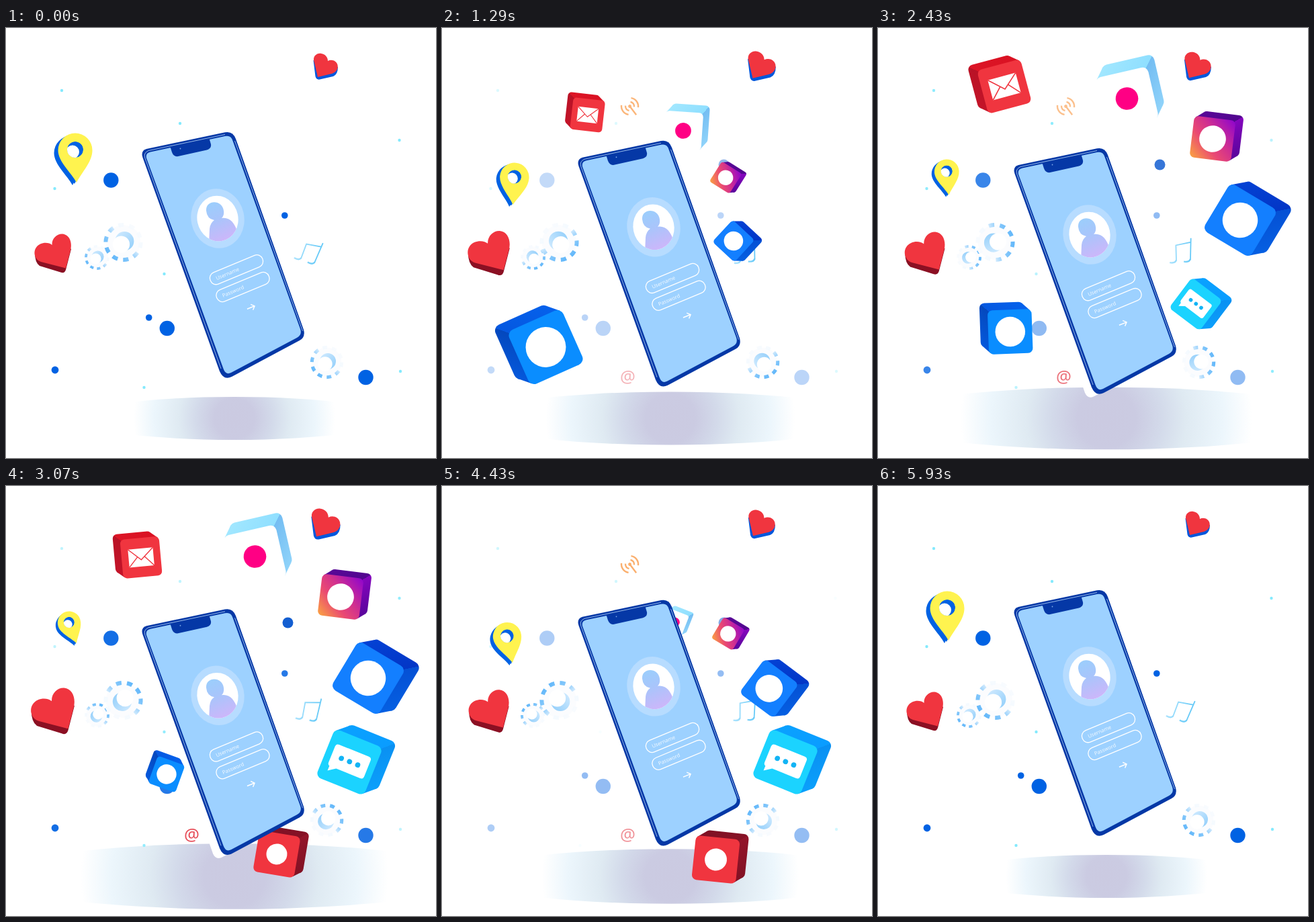
Animation, 640 px wide and 640 px high, one loop 6 s. Source, as an HTML page:

```html
<!DOCTYPE html>
<html lang="en">
<head>
<meta charset="utf-8">
<title>Floating phone</title>
<style>
  html, body { margin: 0; width: 100%; height: 100%; overflow: hidden; background: #fff; }
  svg { display: block; width: 100vw; height: 100vh; }
  text { font-family: "Noto Sans", "Open Sans", sans-serif; }
</style>
</head>
<body>
<svg id="stage" viewBox="0 0 640 640" xmlns="http://www.w3.org/2000/svg"></svg>
<script>
const LOOP = 6000, SPAN = 5930;
const stage = document.getElementById('stage');
const updates = [];
const add = markup => {
  stage.insertAdjacentHTML('beforeend', markup);
  return stage.lastElementChild;
};
const clamp = v => Math.max(0, Math.min(1, v));
const mix = (a, b, k) => a + (b - a) * k;
const tri = u => 1 - Math.abs(1 - 2 * (u % 1));

// Swings between 0 and 1, reversing at each listed time
function zigzag(t, turns, first) {
  let i = 0;
  while (i < turns.length - 2 && t > turns[i + 1]) i++;
  const k = clamp((t - turns[i]) / (turns[i + 1] - turns[i]));
  return i % 2 ? mix(1 - first, first, k) : mix(first, 1 - first, k);
}
const fadeOutIn = (el, ...turns) => updates.push(t => el.setAttribute('opacity', zigzag(t, turns, 1)));
const fadeInOut = (el, ...turns) => updates.push(t => el.setAttribute('opacity', zigzag(t, turns, 0)));
const move = (el, fn) => updates.push((t, u) => el.setAttribute('transform', fn(t, u)));

const stops = list => list.map(([o, c]) => `<stop offset="${o}" stop-color="${c}"/>`).join('');

add(`<defs>
  <radialGradient id="ground" gradientUnits="userSpaceOnUse" cx="0" cy="0" r="150">
    ${stops([[0, '#cbcae1'], [.2, '#cbcbe2'], [.38, '#d3daea'], [.55, '#dfeaf2'], [.8, '#ecf6fc'], [1, '#fff']])}
  </radialGradient>
  <linearGradient id="person" x1="0" y1="0" x2=".3" y2="1">${stops([[0, '#9acffc'], [.45, '#a8c5fb'], [1, '#cdb6fa']])}</linearGradient>
  <linearGradient id="teeth" x1="0" y1="1" x2="1" y2="0">${stops([[.1, '#5fb6fa'], [.4, '#8ccbfb'], [.65, '#f4faff'], [1, '#fbfcfe']])}</linearGradient>
  <linearGradient id="bore" x1="0" y1="0" x2="1" y2="1">${stops([[0, '#d4ecff'], [1, '#8fcdfa']])}</linearGradient>
  <linearGradient id="note" gradientUnits="userSpaceOnUse" x1="-16" y1="0" x2="18" y2="0">${stops([[0, '#a9e2fd'], [1, '#62c8f7']])}</linearGradient>
  <linearGradient id="sunset" x1="0" y1="1" x2="1" y2="0">${stops([[0, '#fba63f'], [.35, '#ea4a72'], [.6, '#d02f90'], [1, '#8d04cf']])}</linearGradient>
  <clipPath id="face"><ellipse cx="315" cy="283.5" rx="30.5" ry="34" transform="rotate(-12 315 283.5)"/></clipPath>
  <clipPath id="hole"><circle cx="2" cy="-52" r="12"/></clipPath>
</defs>`);

const ground = add('<ellipse rx="236" ry="32" fill="url(#ground)"/>');
move(ground, (t, u) => `translate(340 581) scale(${1 + .545 * tri(u)})`);

const dots = (color, ...places) => add(`<g fill="${color}">` +
  places.map(([x, y, r = 2.2]) => `<circle cx="${x}" cy="${y}" r="${r}"/>`).join('') + '</g>');
const SPARK = '#85eafd', BLUE = '#0062e3';
fadeOutIn(dots(SPARK, [83, 93], [259, 142], [72.5, 239], [587, 511]), 0, 900, 2300, 3900, 5300);
fadeOutIn(dots(SPARK, [585.5, 167], [235.5, 366], [205.5, 535]), 0, 1300, 3300, 4500, SPAN);
fadeOutIn(dots(BLUE, [156.3, 226.5, 11.2], [73, 509, 5.4]), 0, 800, 2900, 5150, SPAN);
fadeOutIn(dots(BLUE, [239.8, 447, 11.2], [212.7, 431, 4.8], [414.8, 279, 4.8], [535.5, 520, 11.2]), 0, 1760, 3300, 5250, SPAN);

// Small symbols
const arcs = [6.5, 12.5].map(r => {
  const x = r * .72, y = r * .7;
  return `M${x} ${-y}A${r} ${r} 0 0 1 ${x} ${y}M${-x} ${-y}A${r} ${r} 0 0 0 ${-x} ${y}`;
}).join('');
const antenna = add(`<g transform="translate(279.5 116.5) rotate(-37)" fill="none" stroke="#f99238" stroke-width="2.4">
  <path d="${arcs}M0 0V16"/><circle r="2.4" fill="#f99238" stroke="none"/></g>`);
fadeInOut(antenna, 0, 1950, 3070, 4950, SPAN);
fadeInOut(add('<text x="276.5" y="528" font-size="25.500" text-anchor="middle" fill="#e5404c">@</text>'), 0, 3300, SPAN);
fadeInOut(add('<circle cx="419.500" cy="203.500" r="8" fill="#0a58cf"/>'), 0, SPAN / 2, SPAN);

const note = add(`<g fill="none" stroke="url(#note)" stroke-width="1.800">
  <path d="M-7 14L-6 -9L16 -12M17 -18L14 14"/>
  <path stroke-width="2.400" d="M-7 13Q-9 18 -17 16M14 13Q12 18 4 16"/></g>`);
move(note, t => `translate(450 332) rotate(${mix(-16, 18, zigzag(t, [0, 1800, 3600, 5000, SPAN], 1))})`);

function gear(x, y, r) {
  const pitch = 2 * Math.PI * r * .87 / 20;
  const el = add(`<g>
    <circle r="${r * .86}" fill="#fbfcfe"/>
    <circle r="${r * .87}" fill="none" stroke="url(#teeth)" stroke-width="${r * .2}" stroke-dasharray="${pitch}"/>
    <circle r="${r * .47}" cx="${r * .06}" cy="${-r * .06}" fill="url(#bore)"/>
    <circle r="${r * .42}" cx="${-r * .1}" cy="${r * .1}" fill="#fff"/></g>`);
  move(el, (t, u) => `translate(${x} ${y}) rotate(${-360 * u})`);
}
gear(135.5, 341.5, 19);
gear(174.5, 319, 30);
gear(477.5, 497.5, 25.5);

// Extruded square tiles: fly out from behind the phone, growing and unwinding, then return the same way
let tileCount = 0;
function tile({ from, to, size, turn, spin = 58, times, front, cap, side, dx, dy, art }) {
  const id = 'tile' + tileCount++, h = 50, r = 11, a = h - r * .293;
  const cx = Math.sign(dx) * a, cy = Math.sign(dy) * a, n = 100 / Math.hypot(dx, dy);
  const nx = Math.sign(dx) * n * Math.abs(dy), ny = -Math.sign(dy) * n * Math.abs(dx);
  const box = (x, y, fill) => `<rect x="${x - h}" y="${y - h}" width="100" height="100" rx="${r}" fill="${fill}"/>`;
  const el = add(`<g><linearGradient id="${id}" gradientUnits="userSpaceOnUse"
      x1="${cx - nx}" y1="${cy - ny}" x2="${cx + nx}" y2="${cy + ny}">
      ${stops([[0, cap[0]], [.5, cap[1]], [.5, side[0]], [1, side[1]]])}</linearGradient>
    ${box(dx, dy, `url(#${id})`)}
    <path fill="url(#${id})" d="M${-cx} ${cy}l${dx} ${dy}L${cx + dx} ${-cy + dy}L${cx} ${-cy}Z"/>
    ${box(0, 0, front)}${art}</g>`);
  const [enter, arrive, leave, end] = times;
  move(el, t => {
    const k = clamp(Math.min((t - enter) / (arrive - enter), (end - t) / (end - leave)));
    return `translate(${mix(from[0], to[0], k)} ${mix(from[1], to[1], k)})
      rotate(${turn + spin * (1 - k)}) scale(${size * k / 100})`;
  });
}
const disc = (r, fill = '#fff') => `<circle r="${r}" fill="${fill}"/>`;

tile({
  from: [320, 385], to: [154.5, 475], size: 88, turn: -24, spin: 86, times: [0, 1070, 1790, 4300],
  front: '#0a8dff', cap: ['#0566f2', '#0558e0'], side: ['#0448bd', '#0560ea'], dx: -18, dy: -17, art: disc(34)
});
tile({
  from: [288, 235], to: [188, 87], size: 67, turn: -15, spin: 75, times: [300, 1690, 2850, 4540],
  front: '#f0353f', cap: ['#d80f20', '#dc1526'], side: ['#b91226', '#c8152a'], dx: -18, dy: -15,
  art: `<rect x="-32" y="-23" width="64" height="46" fill="#fff"/>
    <path d="M-32 -23L0 6L32 -23M-32 23L-9 -2M32 23L9 -2" fill="none" stroke="#f0353f" stroke-width="2.400"/>`
});
tile({
  from: [331, 269], to: [370.5, 105], size: 80, turn: -13, times: [300, 1700, 3300, 5200],
  front: '#fff', cap: ['#a8eaff', '#8fdfff'], side: ['#74bdf2', '#a2e2ff'], dx: 16, dy: -20, art: disc(21, '#ff0084')
});
tile({
  from: [323, 298], to: [498, 165], size: 62, turn: 7, times: [600, 1820, 3820, 5300],
  front: 'url(#sunset)', cap: ['#5c0a9c', '#52068f'], side: ['#8505bd', '#4b0590'], dx: 18, dy: -14, art: disc(32)
});
tile({
  from: [308, 354], to: [539, 286], size: 82, turn: 31, spin: 26, times: [400, 2035, 3900, 6250],
  front: '#137fff', cap: ['#0448dc', '#0336c6'], side: ['#0550d4', '#0566e8'], dx: 21, dy: -19, art: disc(32)
});
tile({
  from: [365, 411], to: [511, 411], size: 77, turn: 22, times: [1300, 2830, 4700, 6200],
  front: '#1bd3ff', cap: ['#0aa4ff', '#0a9cff'], side: ['#0a90f2', '#0ba6ff'], dx: 21, dy: -19,
  art: `<path fill="#fff" d="M-31 -24H31Q37 -24 37 -18V15Q37 21 31 21H-19L-33 31V21Q-37 20 -37 15V-18Q-37 -24 -31 -24Z"/>
    <g fill="#12b4f5"><circle cx="-17" cy="-1" r="5"/><circle cy="-1" r="5"/><circle cx="17" cy="-1" r="5"/></g>`
});
tile({
  from: [333, 423], to: [407.5, 556], size: 66, turn: 6, times: [1700, 3160, 4950, 6200],
  front: '#f0353f', cap: ['#7c1022', '#861226'], side: ['#93152a', '#7c1022'], dx: 19, dy: -14, art: disc(25)
});

// Phone
const field = (x, y, label) => `<g transform="translate(${x} ${y}) rotate(-22.6)">
  <rect x="-42" y="-9.3" width="84" height="18.6" rx="8.8" fill="none" stroke="#fff" stroke-width="1.3"/>
  <text x="-33" y="3" font-size="7.6" fill="#f2f9ff">${label}</text></g>`;
const phone = add(`<g>
  <path fill="#fff" d="M298 490L308 519Q312 528 320 525L342 514Z"/>
  <path fill="#0538a6" d="M209 180L326 155.3Q337.5 153 342 165L443 449Q446 460 437 465L336 519Q324 525 318 511L203.5 193Q200 183 209 180Z"/>
  <path fill="none" stroke="#b9d8fb" stroke-width=".8" d="M320 507L207 194Q204 186 212 182.5L326 158.5M340.5 168L441.5 451"/>
  <path fill="#9dd1ff" d="M209.5 195L323.5 507Q327 517 335 513L433 461Q441 457 438 448L337.5 168Q335 159 326 161L215 184.5Q206.5 186.5 209.5 195Z"/>
  <path fill="#0538a6" d="M244.5 177L247 185Q249.5 192 256 191L299 181.5Q306 179.5 305 173L302.5 164.5Z"/>
  <circle cx="259.5" cy="179.5" r=".9" fill="#7fa8e8"/>
  <ellipse cx="315" cy="283.5" rx="39.5" ry="44.5" fill="#b7dcff" transform="rotate(-12 315 283.5)"/>
  <g clip-path="url(#face)"><path fill="#fff" d="M280 245H350V322H280Z"/>
    <path fill="url(#person)" d="M298 272C297 255 322 255 324 272Q325 279 321 283C333 281 340 290 344 302L338 322H302L303 299Q304 290 310 286Q299 284 298 272Z"/></g>
  ${field(343, 359.7, 'Username')}${field(352.5, 385.5, 'Password')}
  <path transform="translate(364.5 416) rotate(-22)" d="M-6 0H6M1.5 -4.5L6 0L1.5 4.5" fill="none" stroke="#fff" stroke-width="1.4"/>
</g>`);
move(phone, (t, u) => `translate(0 ${29.3 * tri(u)})`);

// Map pin, anchored at its tip: two bounces, leaning right, then recovering from the left
const drop = 'M4 -3C-4 -18 -23.5 -34 -23.5 -51A25.5 25.5 0 0 1 27.5 -51C27.5 -34 13 -20 4 -3Z';
const pin = add(`<g>
  <path d="${drop}" fill="${BLUE}" transform="translate(-6 4)"/>
  <path d="${drop}" fill="${BLUE}" transform="translate(-3 2)"/>
  <path d="${drop}" fill="#fff34f"/>
  <g clip-path="url(#hole)"><circle cx="2" cy="-52" r="12" fill="${BLUE}"/><circle cx="-2" cy="-48.5" r="10" fill="#fff"/></g></g>`);
const lean = u => u < .34 ? 26 * u : u < .5 ? mix(9, -18, (u - .34) / .16) : -36 * (1 - u);
move(pin, (t, u) => {
  const y = 233 + 33 * Math.sin(Math.PI * (2 * u % 1));
  return `translate(${101 + 2 * tri(u)} ${y}) rotate(${lean(u)}) scale(${1 - .34 * tri(u)})`;
});

// Beating hearts
function heart(x, y, back, shade, front) {
  const el = add(`<g><path fill="${shade}" d="${back}"/><path fill="#f0353f" d="${front}"/></g>`);
  move(el, (t, u) => `translate(${x} ${y}) scale(${1 + .21 * tri(3 * u)}) translate(${-x} ${-y})`);
}
heart(71, 338,
  'M43 335Q43 349 50 354L81 363.5Q87 366 89 360L97 329L85 320Z', '#8b1023',
  'M89 357.5L52 348C40 344 39 327 51 321.5C58 318.5 65 320 68.5 323C68 313 76 306 84 306.5C95 307.5 99 320 96 331Z');
heart(474.5, 61,
  'M457.5 48L460.5 72Q462 77.5 467 76.5L487 72Q494 69 494 58Z', '#0057dc',
  'M464 73L458.5 50C456 42 463 37 469 38C475 39 479 43 479 49C485 46 492 49 493.5 55C495 62 490 66.5 485 68Z');

function draw(now) {
  const t = Math.min(now % LOOP, SPAN);
  updates.forEach(update => update(t, t / SPAN));
}
const start = performance.now();
function tick() {
  draw(performance.now() - start);
  requestAnimationFrame(tick);
}
tick();
</script>
</body>
</html>
```
